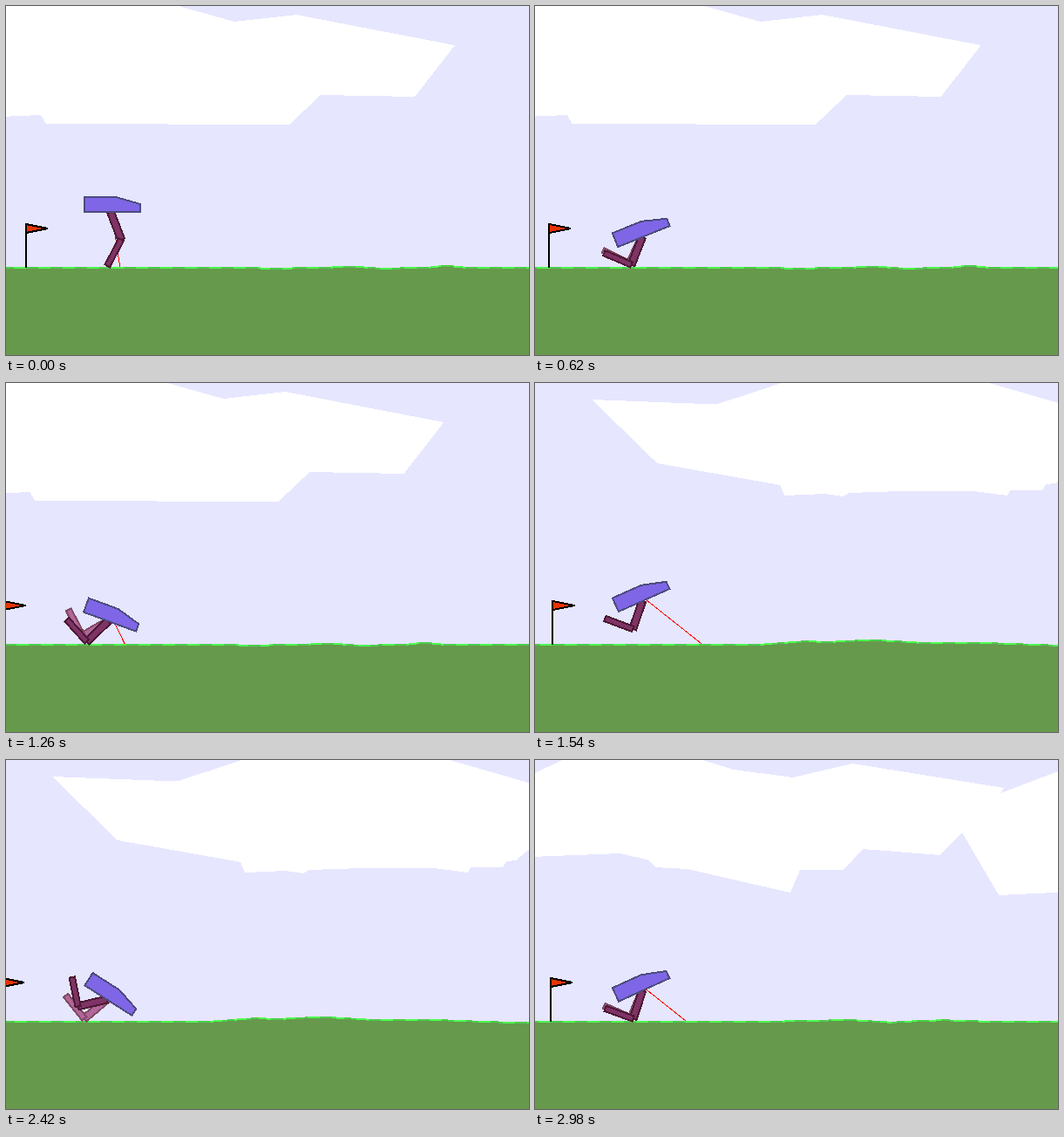
An HTML page for the animation above (3020 ms loop, 600 px wide and 400 px high).

```html
<!DOCTYPE html>
<html lang="en">
<head>
<meta charset="utf-8">
<title>Two-legged walker</title>
<style>
  html, body { margin: 0; width: 100%; height: 100%; overflow: hidden; background: #e6e6ff; }
  svg { display: block; width: 600px; height: 400px; shape-rendering: crispEdges; }
</style>
</head>
<body>
<svg id="stage" viewBox="0 0 600 400"></svg>
<script>
const LOOP = 3020, STEP = 20, LAST = 149;
const HULL_X = 120, STAND_Y = 228, GROUND_Y = 300, KNEE_Y = 296.5;
const LEG = 34, STAND_THIGH = 21, STAND_BEND = 49, FULL_BEND = 91.7;
const TILE = 14, FLAG_WORLD = 42, FLAG_START = 23;

// tilt: [local step, hull tilt, angle between the legs], in degrees.
// hills: [x, height, width]; hills and cloud are placed for a flag at x = ref.
const episodes = [
  {
    start: 0, ref: 23, firstRay: 1,
    tilt: [[2, -24, 3], [31, -22, 4], [53, 8.5, 14], [74, 33, 14]],
    hills: [[310, -1.5, 16], [395, 1.7, 18], [435, -1, 20], [505, 2.2, 14]],
    cloud: "-30,128 40,125 46,135 325,136 361,102 469,104 515,45 333,10 262,18 180,-5 -30,-5"
  },
  {
    start: 75, ref: 20, firstRay: 3,
    tilt: [[2, -24, 0], [22, -19, 4], [46, 32.5, -27], [51, 36, -29]],
    hills: [[305, 3, 30], [385, 5, 55], [500, 2.2, 50], [610, -1, 30]],
    cloud: "65,19 208,24.5 298,-5 504,-5 680,46 597,115 586,116 582,123 545,123 542,129 503,124 " +
           "420,124 360,126 353,130 333,127 286,129 281,117 140,92"
  },
  {
    start: 127, ref: 18, firstRay: 3,
    tilt: [[2, -26, 0], [22, -24.5, 4]],
    hills: [[305, 1, 22], [355, 2, 28], [410, -1, 14], [468, 1.6, 38]],
    cloud: "-30,29 42,-5 176,-5 228,11 296,20 364,4 538,32 534,38 640,-2 640,150 532,155 490,83 " +
           "465,109 376,102 354,126 304,126 293,152 175,125 138,123 131,115 98,107 -30,112"
  }
];

const stage = document.getElementById("stage");

function set(node, attrs) {
  for (const key in attrs) node.setAttribute(key, attrs[key]);
}

function add(tag, attrs) {
  const node = document.createElementNS("http://www.w3.org/2000/svg", tag);
  set(node, attrs);
  return stage.appendChild(node);
}

const body = (fill, stroke) => add("polygon", { fill, stroke, "stroke-width": 2 });

const cloud = add("polygon", { fill: "#fff" });
const soil = add("polygon", { fill: "#66994c" });
const grass = ["#4dff4d", "#4dcc4d"].map(stroke => add("path", { stroke, "stroke-width": 2 }));
const beam = add("line", { stroke: "#f00" });
const lightLeg = [0, 1].map(() => body("#b26699", "#7f4c66"));
const darkLeg = [0, 1].map(() => body("#7f3366", "#4c1933"));
const hull = body("#7f66e6", "#4c4c7f");
const pole = add("path", { stroke: "#000", "stroke-width": 2 });
const pennant = body("#e63300", "#000");

const rad = degrees => degrees * Math.PI / 180;
const mix = (a, b, k) => a + (b - a) * k;

// Linear interpolation over rows keyed by their first entry; holds at both ends.
function sample(rows, at) {
  if (at <= rows[0][0]) return rows[0];
  const i = rows.findIndex(row => row[0] >= at);
  if (i < 0) return rows[rows.length - 1];
  const a = rows[i - 1], b = rows[i], k = (at - a[0]) / (b[0] - a[0]);
  return a.map((v, n) => mix(v, b[n], k));
}

function place(points, x, y, angle) {
  const c = Math.cos(angle), s = Math.sin(angle);
  return points.map(([px, py]) => [x + px * c - py * s, y + px * s + py * c]);
}

function outline(node, points) {
  node.setAttribute("points", points.map(p => p.map(v => v.toFixed(2)).join()).join(" "));
}

// The legs fold twice as fast as the hull drops; then the walker rocks on its knees,
// so height, thighs and scroll all follow from the hull tilt.
function poseAt(episode, local) {
  const drop = Math.min(1, local / 4), fold = Math.min(1, local / 2);
  const [, settledTilt, spread] = sample(episode.tilt, local);
  const kneelY = 261.6 + 0.19 * settledTilt;
  const hipY = kneelY + 8 * Math.cos(rad(settledTilt));
  const kneelThigh = -Math.acos((KNEE_Y - hipY) / LEG) / rad(1);
  const thigh = mix(STAND_THIGH, kneelThigh, fold);
  const kneelFlag = 4.25 - 0.429 * settledTilt + 0.0054 * settledTilt ** 2;
  return {
    tilt: rad(settledTilt * fold),
    y: mix(STAND_Y, kneelY, drop),
    flagX: mix(FLAG_START, kneelFlag, drop),
    bend: mix(STAND_BEND, FULL_BEND, fold),
    dark: thigh + Math.min(0, spread) * fold,
    light: thigh - Math.max(0, spread) * fold
  };
}

function drawLeg(parts, hip, thigh, bend) {
  let joint = hip;
  parts.forEach((part, i) => {
    const half = i ? 3.2 : 4, angle = -rad(thigh - bend * i);
    outline(part, place([[-half, 0], [half, 0], [half, LEG], [-half, LEG]], ...joint, angle));
    joint = place([[0, LEG]], ...joint, angle)[0];
  });
}

function drawGround(hills, flagX, shift) {
  const scroll = FLAG_WORLD - flagX, first = Math.floor(scroll / TILE);
  const points = [], paths = ["", ""];
  for (let i = first; i < first + 46; i++) {
    const x = i * TILE - scroll;
    const rise = hills.reduce((sum, [at, h, w]) => sum + h * Math.exp(-(((x - shift - at) / w) ** 2)), 0);
    points.push([x, GROUND_Y - rise]);
  }
  for (let n = 1; n < points.length; n++) {
    paths[(first + n + 1) % 2] += `M${points[n - 1]}L${points[n]}`;
  }
  outline(soil, [...points, [660, 400], [-20, 400]]);
  grass.forEach((path, n) => path.setAttribute("d", paths[n]));
}

// Ten rays sweep out and back, then pause; five sweep ticks pass per step.
function drawBeam(tick, y) {
  beam.style.display = tick < 20 ? "" : "none";
  const angle = 0.15 * Math.min(tick, Math.abs(19 - tick));
  const length = Math.min(160, (GROUND_Y - 1 - y) / Math.cos(angle));
  set(beam, {
    x1: HULL_X, y1: y,
    x2: HULL_X + length * Math.sin(angle), y2: y + length * Math.cos(angle)
  });
}

function draw(time) {
  const step = Math.min(LAST, Math.floor(time % LOOP / STEP));
  const episode = episodes.filter(e => e.start <= step).pop();
  const local = step - episode.start;
  const { tilt, y, flagX, bend, dark, light } = poseAt(episode, local);
  const shift = flagX - episode.ref;

  set(cloud, { points: episode.cloud, transform: `translate(${shift / 2} 0)` });
  drawGround(episode.hills, flagX, shift);
  drawBeam((episode.firstRay + 5 * local) % 100, y);

  const [hip] = place([[0, 8]], HULL_X, y, tilt);
  drawLeg(lightLeg, hip, light, bend);
  drawLeg(darkLeg, hip, dark, bend);
  outline(hull, place([[-30, -9], [6, -9], [34, -1], [34, 8], [-30, 8]], HULL_X, y, tilt));

  pole.setAttribute("d", `M${flagX} ${GROUND_Y}v-50`);
  outline(pennant, [[flagX, 250], [flagX, 260], [flagX + 25, 255]]);
}

const begin = performance.now();
function tick() {
  draw(performance.now() - begin);
  requestAnimationFrame(tick);
}
tick();
</script>
</body>
</html>
```
